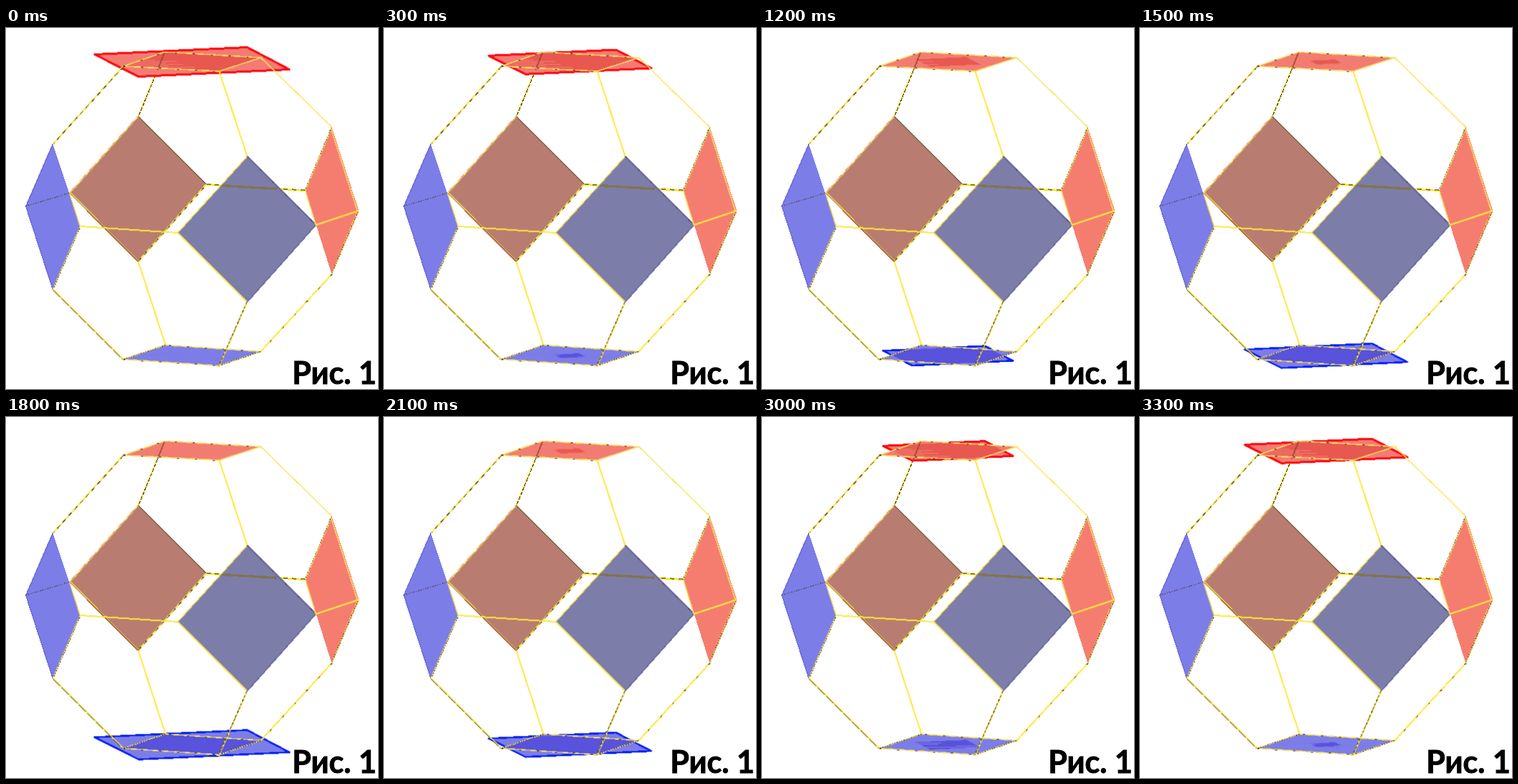
Write an HTML page that moves like this. It is 519 by 505 pixels and loops after 3600 ms.

```html
<!DOCTYPE html>
<html lang="ru">
<head>
<meta charset="utf-8">
<style>
html, body { margin: 0; width: 100%; height: 100%; overflow: hidden; background: #fff; }
svg { display: block; width: 519px; height: 505px; }
.red { fill: #f37c72; }
.blue { fill: #7d7de8; }
.dark-red { fill: #e85850; }
.dark-blue { fill: #5852dc; }
.edge, .ink, .pale { fill: none; stroke-linejoin: round; }
.edge { stroke: #ffe63c; stroke-width: 2; }
.pale { stroke: #fae45c; stroke-width: 1.5; }
.ink { stroke: #3a3208; stroke-width: 1; }
.dot { stroke-dasharray: 1.5 2; }
.dash { stroke-dasharray: 6 6; }
.sparse { stroke-dasharray: 3 22; }
.outline { stroke-width: 3; stroke-linejoin: round; }
.red.outline { stroke: #ff0812; }
.blue.outline { stroke: #0420f8; stroke-width: 2.6; }
#slice { vector-effect: non-scaling-stroke; }
.shrink { animation: shrink 3.6s infinite; }
.grow { animation: grow 3.6s infinite; }
.thin { animation: thin 3.6s step-end infinite; }
@keyframes shrink {
  0%, 100% { transform: scale(1); animation-timing-function: steps(6, end); }
  50% { transform: scale(0); animation-timing-function: steps(6, end); }
}
@keyframes grow {
  0%, 100% { transform: scale(0); animation-timing-function: steps(6, end); }
  50% { transform: scale(1); animation-timing-function: steps(6, end); }
}
@keyframes thin {
  0% { opacity: 1; }
  33.333% { opacity: 0; }
  75%, 100% { opacity: 1; }
}
text { font: 700 43px Lato, "Open Sans", sans-serif; stroke: #000; stroke-width: .9; }
</style>
</head>
<body>
<svg viewBox="0 0 519 505">
  <defs>
    <polygon id="slice" points="-136,-10.5 77,-20.5 136,10.5 -74.5,20.5"/>
    <polygon id="top" points="221,33 355,41 297,60 163,53"/>
    <polygon id="bottom" points="222,443 355,452 297,472 163,463"/>
    <clipPath id="inTop"><use href="#top"/></clipPath>
    <clipPath id="inBottom"><use href="#bottom"/></clipPath>
  </defs>

  <g transform="translate(.5 .5)" shape-rendering="crispEdges">
    <!-- rear edges -->
    <path class="edge" d="M221 33L184 123"/>
    <path class="ink" stroke-dasharray="5 2" d="M221.5 33L184.5 123"/>
    <path class="edge" style="stroke-width:3" d="M279 218.5L417 227"/>
    <path class="ink dash" d="M279 218L417 226.5"/>

    <!-- side faces -->
    <polygon fill="#b87d70" points="184,123 279,218 184,326 89,230"/>
    <polygon fill="#7d7daa" points="336,179 432,275 336,383 239,286"/>
    <path d="M301 220L377 224.5" stroke="#80754f" stroke-width="3.4"/>
    <polygon class="blue" points="65,162 103,277 65,365 27,249"/>
    <path d="M65 162L27.500 249L65 365" fill="none" stroke="#7272dc" stroke-width="2"/>
    <polygon fill="#f57d70" points="454,138 492,256 454,344 417,227"/>

    <!-- moving sections -->
    <g transform="translate(259 47)"><use href="#slice" class="red outline shrink"/></g>
    <g transform="translate(259 458)"><use href="#slice" class="blue outline grow"/></g>

    <!-- caps and their overlap with the sections -->
    <use href="#top" class="red"/>
    <g clip-path="url(#inTop)">
      <g transform="translate(259 47)"><use href="#slice" class="dark-red shrink"/></g>
      <path stroke="#f37c72" d="M160 44H208M160 46H238M160 48H222M160 50H246M160 52H226M160 54H262"/>
    </g>
    <use href="#bottom" class="blue"/>
    <g clip-path="url(#inBottom)">
      <g transform="translate(259 458)"><use href="#slice" class="dark-blue grow"/></g>
      <path class="thin" stroke="#7d7de8" d="M160 455H250M160 457H245M270 459H360M225 461H360"/>
    </g>
    <path d="M221 33L211 58" stroke="#8c4528" stroke-width="1.6"/>

    <!-- cap outlines -->
    <use href="#top" class="pale"/>
    <path class="ink sparse" d="M163 53L221 33.500L355 41.500"/>
    <path class="ink sparse" d="M163 53L297 60.500"/>
    <use href="#bottom" class="pale"/>
    <path class="ink sparse" d="M355 452.500L222 443.500M163 463.500L297 472"/>
    <path class="ink dot" d="M222 443.500L163 463M297 472L355 452"/>

    <!-- side face outlines -->
    <path class="edge" d="M89 230L184 326L279 218"/>
    <path class="pale" d="M89 230L184 123"/>
    <path class="ink dash" d="M184 326L279.500 218.500"/>
    <path class="ink" d="M184 123L279.500 218.500"/>
    <path d="M88.500 230.500L184 326.500" stroke="#8c4024" stroke-width="1.2"/>
    <path d="M89 229L183.500 123" stroke="#f0905c" stroke-width="1" stroke-dasharray="14 6"/>
    <path class="pale" d="M336 179L239 286L336 383"/>
    <path d="M336 179L432 275L336 383" fill="none" stroke="#66659c" stroke-width="1.6"/>
    <path class="ink sparse" d="M336 179L432 275"/>
    <path class="pale" d="M88 230L103 277L65 365"/>
    <path class="ink dot" d="M103.500 277L65.500 365"/>
    <path class="ink dot" d="M27 249L88 230"/>
    <path class="pale" d="M454 139L417 227L432 276M453 140L490 256L454 344"/>
    <path class="ink dot" d="M453.500 139L416.500 227M490 257L454 343"/>
    <path class="edge" d="M432 275L492 255"/>

    <!-- connecting edges -->
    <path class="edge" d="M163 53L65 162M297 60L336 179M103 277L239 286M184 326L222 443M336 383L297 472M65 365L163 463M454 344L355 452"/>
    <path class="pale" d="M355 41L454 138"/>
    <path class="ink dash" d="M163.500 53.500L65.500 161.500"/>
    <path class="ink sparse" d="M454.500 344L355.500 452"/>
    <path class="ink" stroke-dasharray="4 2" d="M335.500 383L296.500 472"/>
    <path class="ink" stroke-dasharray="14 3" d="M65 366L162.500 463.500"/>
  </g>

  <text x="458" y="498" text-anchor="middle">Рис. 1</text>
</svg>
</body>
</html>
```
